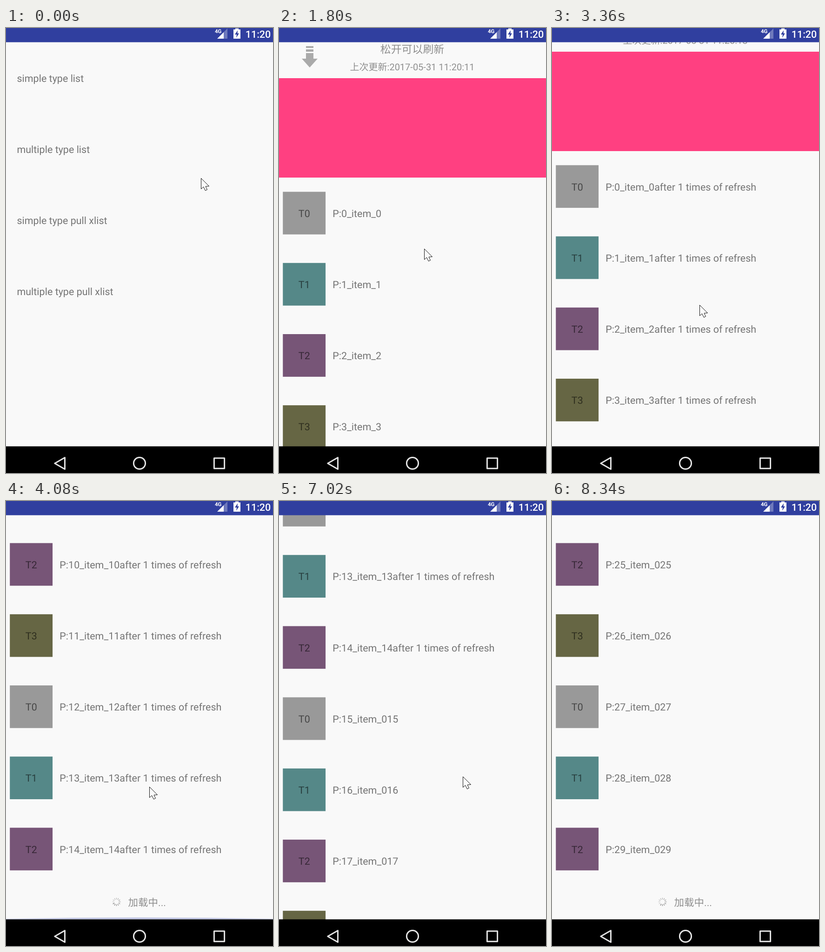
Animation of 574 by 958 pixels, one loop 8.4 s. Source, as an HTML page with a canvas:

```html
<!DOCTYPE html>
<html lang="zh-CN">
<head>
<meta charset="utf-8">
<style>
html, body { margin: 0; width: 100%; height: 100%; overflow: hidden; background: #fafafa; }
canvas { display: block; }
</style>
</head>
<body>
<canvas id="stage" width="574" height="958"></canvas>
<script>
const ctx = document.getElementById('stage').getContext('2d');
ctx.textRendering = 'geometricPrecision';
const W = 574, H = 958, TOP = 30.6, BOTTOM = 900.6;
const LOOP = 8400, STEP = 60;
const ROW = 153.2, BANNER = 214, FOOTER_H = 76, PAGE = 15;
const LIST_TOP = 30;
const FAMILY = 'Roboto, "Noto Sans CJK SC", "Noto Sans CJK", sans-serif';
const TEXT = '#757575', PALE = '#8f8f8f';
const TILES = ['#999999', '#558888', '#775577', '#666644'];

const OPEN = 1020, RELEASE = 2100, REFRESHED = 3150;
const FAILED = 4800, RETRY = 5640, LOADED = 6540;
const ARMED_PULL = 76, ARMED_AT = 1800;

// Keyframes: [time, values, easing of the segment that ends here]
const linear = p => p;
const decel = p => 1 - (1 - p) ** 2;
const smooth = p => p * p * (3 - 2 * p);

const PULL = [[1500, [0]], [1800, [78]], [2040, [145]], [RELEASE, [145]],
  [2460, [92], decel], [REFRESHED, [92]], [3550, [0], decel]];
const SCROLL = [[3720, [0]], [3840, [420]], [4050, [1716]], [6840, [1716]],
  [7020, [2150]], [7380, [3472]], [7560, [4014]]];
const CURSOR = [[0, [419, 323]], [540, [210, 578], smooth], [1080, [210, 578]],
  [1440, [306, 335], smooth], [1500, [306, 335]], [1800, [312, 475]], [2040, [317, 596]],
  [3360, [317, 596]], [3600, [312, 780], smooth], [3720, [312, 780]], [3900, [306, 430]],
  [4080, [308, 615], smooth], [4560, [330, 857], smooth], [5040, [315, 857], smooth],
  [5700, [315, 857]], [6660, [340, 835], smooth], [6840, [340, 835]], [7200, [450, 350]],
  [7380, [455, 328]], [7740, [480, 280]], [8000, [520, 196]], [8300, [580, 215]]];
const GLOW = [[4050, [0]], [4080, [4]], [4200, [70], decel], [4560, [0]],
  [7560, [0]], [7740, [75], decel], [8160, [0]]];
const SLIDE = [[OPEN, [37, 0.6]], [1140, [0, 1], decel]];

function sample(keys, t) {
  const next = keys.findIndex(k => k[0] > t);
  if (next === 0) return keys[0][1];
  if (next < 0) return keys[keys.length - 1][1];
  const [t0, from] = keys[next - 1], [t1, to, ease = linear] = keys[next];
  const p = ease((t - t0) / (t1 - t0));
  return from.map((v, i) => v + (to[i] - v) * p);
}

function rect(x, y, w, h, color) {
  ctx.fillStyle = color;
  ctx.fillRect(x, y, w, h);
}

function label(str, x, y, size = 21.5, color = TEXT, align = 'left', weight = 400) {
  ctx.font = `${weight} ${size}px ${FAMILY}`;
  ctx.textAlign = align;
  ctx.fillStyle = color;
  ctx.fillText(str, x, y);
}

function trace(points) {
  ctx.beginPath();
  points.forEach(([x, y]) => ctx.lineTo(x, y));
  ctx.closePath();
}

function polygon(points, color) {
  trace(points);
  ctx.fillStyle = color;
  ctx.fill();
}

function spinner(x, y, inner, outer, t) {
  const head = Math.floor(t / STEP);
  ctx.lineWidth = outer / 6;
  for (let i = 0; i < 12; i++) {
    const a = i * Math.PI / 6, age = (((head - i) % 12) + 12) % 12;
    ctx.strokeStyle = `rgba(110,110,110,${0.75 - age * 0.045})`;
    ctx.beginPath();
    ctx.moveTo(x + inner * Math.sin(a), y - inner * Math.cos(a));
    ctx.lineTo(x + outer * Math.sin(a), y - outer * Math.cos(a));
    ctx.stroke();
  }
}

function pullArrow(x, y, angle) {
  ctx.save();
  ctx.translate(x, y);
  ctx.rotate(angle);
  rect(-8, -23, 16, 4, '#aaa');
  rect(-8, -16, 16, 5, '#aaa');
  rect(-8, -8, 16, 13, '#aaa');
  polygon([[-17, 4], [17, 4], [0, 23]], '#aaa');
  ctx.restore();
}

function drawHeader(bottom, pull, t) {
  const refreshing = t >= RELEASE && t < REFRESHED;
  const armed = t < RELEASE && pull >= ARMED_PULL;
  const title = refreshing ? '正在刷新...' : armed ? '松开可以刷新' : '下拉可以刷新';
  const second = t < REFRESHED ? '11' : '18';
  label(title, 286.5, bottom - 54, 22.9, PALE, 'center');
  label('上次更新:2017-05-31 11:20:' + second, 286.5, bottom - 17, 20, PALE, 'center');
  if (refreshing) spinner(66, bottom - 46, 9, 18, t);
  else pullArrow(66, bottom - 46, armed ? -Math.PI * Math.min(1, (t - ARMED_AT) / 180) : 0);
}

function drawRow(i, top, t) {
  const y = top + 30.6, baseline = Math.round(y + 54.3);
  const type = i % PAGE % TILES.length;
  const suffix = i >= PAGE ? '0' + i : i + (t >= REFRESHED ? 'after 1 times of refresh' : '');
  rect(8.3, y, 91.8, 91.8, TILES[type]);
  label('T' + type, 54.3, baseline, 21.5, 'rgba(0,0,0,0.54)', 'center');
  label(`P:${i}_item_${suffix}`, 115.3, baseline);
}

function drawFooter(top, t) {
  const y = Math.round(top + FOOTER_H / 2);
  if (t >= FAILED && t < RETRY) {
    label('加载失败，点击重试', 294.5, y + 8, 21.9, PALE, 'center');
  } else {
    spinner(237.5, y - 1, 5, 9, t);
    label('加载中...', 262.5, y + 8, 21.5, PALE);
  }
}

function drawGlow(height) {
  if (height < 1) return;
  ctx.beginPath();
  ctx.moveTo(0, BOTTOM);
  ctx.lineTo(0, BOTTOM - height * 0.3);
  ctx.quadraticCurveTo(W / 2, BOTTOM - height * 1.7, W, BOTTOM - height * 0.3);
  ctx.lineTo(W, BOTTOM);
  ctx.fillStyle = 'rgba(63,81,181,0.3)';
  ctx.fill();
}

function drawWindow(drawContent) {
  rect(0, 0, W, H, '#f9f9f9');
  drawContent();
  rect(0, 0, W, TOP, '#303f9f');
  rect(0, BOTTOM, W, H - BOTTOM, '#000');
}

function drawMenu() {
  ['simple type list', 'multiple type list', 'simple type pull xlist', 'multiple type pull xlist']
    .forEach((name, i) => label(name, 23.4, Math.round(115.5 + i * ROW)));
}

function drawList(t) {
  const [pull] = sample(PULL, t), [scroll] = sample(SCROLL, t);
  const count = t < LOADED ? PAGE : 2 * PAGE;
  const top = LIST_TOP + pull - scroll, rowsTop = top + BANNER;
  if (pull > 0) drawHeader(Math.round(top), pull, t);
  rect(0, Math.round(top), W, BANNER, '#ff4081');
  for (let i = 0; i < count; i++) {
    const y = rowsTop + i * ROW;
    if (y > -ROW && y < BOTTOM) drawRow(i, y, t);
  }
  const footerTop = rowsTop + count * ROW;
  if (footerTop < BOTTOM) drawFooter(footerTop, t);
  drawGlow(sample(GLOW, t)[0]);
}

function drawSystemIcons() {
  label('4G', 449, 11, 11.5, '#fff', 'left', 700);
  polygon([[454, 23], [468, 9], [468, 23]], '#fff');
  polygon([[468, 9], [476, 1], [476, 23], [468, 23]], 'rgba(255,255,255,0.3)');
  rect(489, 3, 15, 20, '#fff');
  rect(493, 1, 7, 2, '#fff');
  polygon([[498, 5], [492, 14], [496, 14], [495, 21], [501, 11.5], [497.5, 11.5]], '#303f9f');
  label('11:20', 514.7, 21, 21.5, '#fff', 'left', 500);

  ctx.strokeStyle = '#e3e3e3';
  ctx.lineWidth = 3;
  ctx.lineJoin = 'round';
  trace([[104.8, 937.2], [126.5, 924.8], [126.5, 949.8]]);
  ctx.stroke();
  ctx.beginPath();
  ctx.arc(287, 937, 12.6, 0, Math.PI * 2);
  ctx.stroke();
  ctx.strokeRect(447.4, 926, 22.2, 22.2);
}

function drawCursor(x, y) {
  ctx.save();
  ctx.translate(Math.round(x) + 0.5, Math.round(y) + 0.5);
  polygon([[0, 0], [0, 23], [5, 18.5], [9, 26.5], [13, 24.5], [9.5, 17.5], [17, 17]], '#fbfbfb');
  ctx.strokeStyle = '#111';
  ctx.lineWidth = 1;
  ctx.lineJoin = 'miter';
  ctx.stroke();
  ctx.restore();
}

function render(now) {
  const t = Math.floor(now % LOOP / STEP) * STEP;
  if (t < 1140) drawWindow(drawMenu);
  if (t >= OPEN) {
    const [shift, alpha] = sample(SLIDE, t);
    ctx.save();
    ctx.globalAlpha = alpha;
    ctx.translate(0, shift);
    drawWindow(() => drawList(t));
    ctx.restore();
  }
  drawSystemIcons();
  drawCursor(...sample(CURSOR, t));
}

const start = performance.now();
(function loop() {
  render(performance.now() - start);
  requestAnimationFrame(loop);
})();
</script>
</body>
</html>
```
